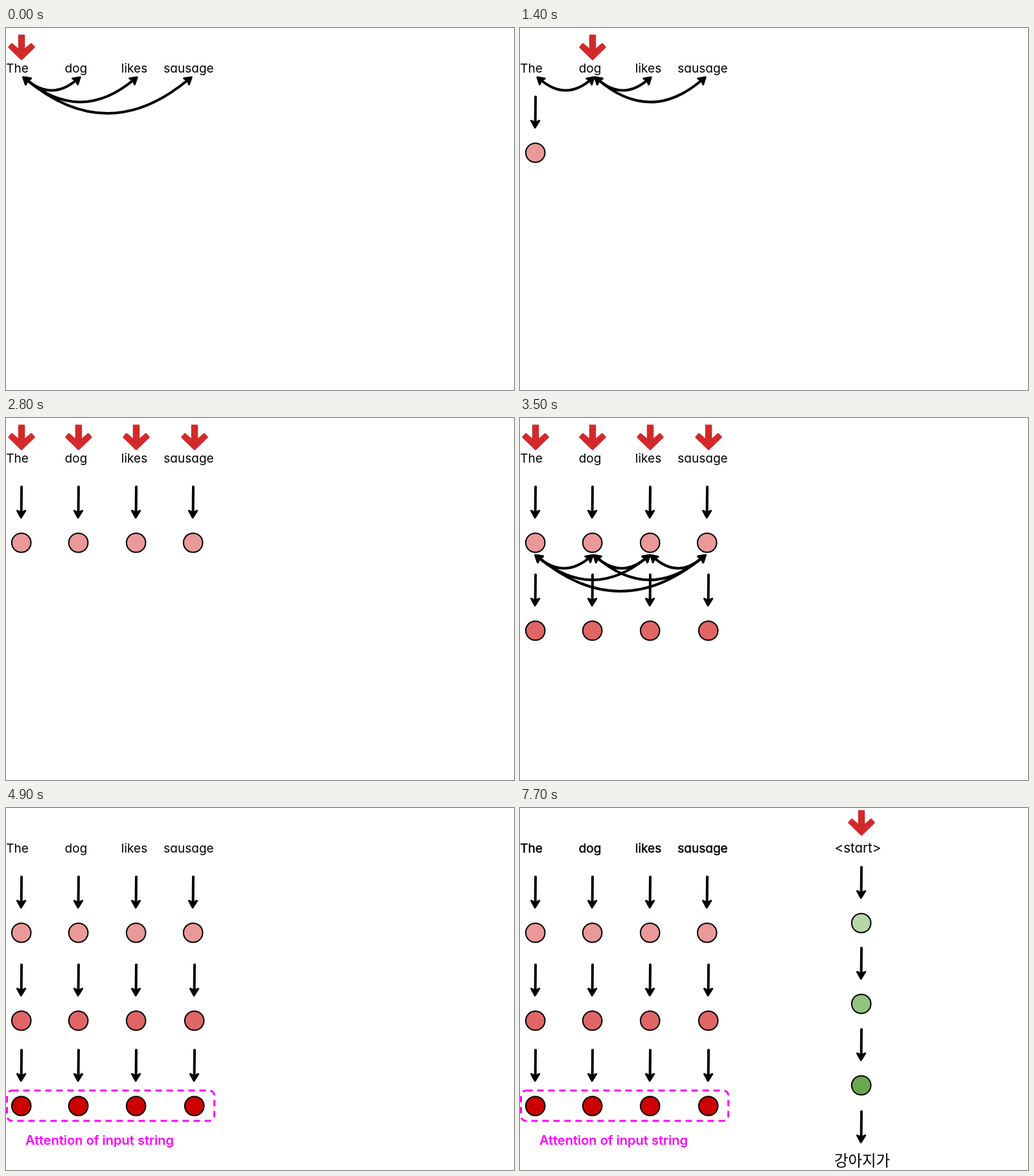
An HTML page that plays this animation: 784 px wide and 560 px high, repeating every 8 s.

```html
<!DOCTYPE html>
<html lang="en">
<head>
<meta charset="utf-8">
<title>Attention diagram</title>
<style>
  html, body { margin: 0; width: 100%; height: 100%; overflow: hidden; background: #fff; }
  svg { display: block; }
  text { font-family: Inter, "Open Sans", sans-serif; font-feature-settings: "cv11"; text-anchor: middle; }
  .hangul { font-family: "Noto Sans CJK KR", "Noto Sans CJK", sans-serif; }
</style>
</head>
<body>
<svg id="stage" width="784" height="560" viewBox="0 0 784 560"></svg>
<script>
const STEP = 700, LOOP = 8000;
const MAGENTA = '#ff00ff';
const stage = document.getElementById('stage');

const words = [['The', 17.5], ['dog', 108], ['likes', 198], ['sausage', 282]];
const columns = [24, 112, 201, 291];
const encoder = [
  { arrow: 105, node: 193, fill: '#ea9999', xs: [24, 112, 201, 289] },
  { arrow: 241, node: 329, fill: '#e06666', xs: columns },
  { arrow: 373, node: 461, fill: '#cc0000', xs: columns }
];
const decoder = [
  { arrow: 90, node: 178, fill: '#b6d7a8' },
  { arrow: 215, node: 303, fill: '#93c47d' },
  { arrow: 341, node: 429, fill: '#6aa84f' }
];
const wordTips = [26, 115, 203, 287], nodeTips = [23, 113, 201, 287];
const arcDepth = [0, 19.5, 37.5, 55];
const pairs = [[0, 1], [0, 2], [0, 3], [1, 2], [1, 3], [2, 3]];

const label = (str, x, y, size, extra = '') =>
  `<text x="${x}" y="${y}" font-size="${size}" ${extra}>${str}</text>`;

const pointer = (x, y) =>
  `<path transform="translate(${x} ${y})" fill="#d22a2a" stroke="#d22a2a" stroke-width="2.5" stroke-linejoin="round"
    d="M-4 1.5H4V24L15 14.5 19.5 19.5 0 38.5-19.5 19.5-15 14.5-4 24Z"/>`;

const downArrow = (x, y) =>
  `<g transform="translate(${x} ${y})" stroke="#000" stroke-linecap="round" stroke-linejoin="round">
    <path d="M0 1.5L-.4 43" stroke-width="4"/>
    <path d="M-6.5 38.5L-.8 49 5.7 38.5-.4 41.5Z" stroke-width="3"/></g>`;

const node = (x, y, fill) =>
  `<circle cx="${x - .3}" cy="${y}" r="14.8" fill="${fill}" stroke="#000" stroke-width="2"/>`;

const cell = (x, row) => downArrow(x, row.arrow) + node(x, row.node, row.fill);

function head(x, y, angle) {
  return `<path transform="translate(${x} ${y}) rotate(${angle})" d="M-1 0L-11-6-9 0-11 6Z"
    stroke="#000" stroke-width="3" stroke-linejoin="round"/>`;
}

function arc(tips, y, [a, b]) {
  const x1 = tips[a], x2 = tips[b], depth = arcDepth[b - a] * 2;
  const angle = Math.atan2(depth, (x2 - x1) / 2) * 180 / Math.PI;
  return `<path d="M${x1 + 4} ${y + 3}Q${(x1 + x2) / 2} ${y + depth} ${x2 - 4} ${y + 3}"
    fill="none" stroke="#000" stroke-width="4"/>` + head(x1, y, 180 + angle) + head(x2, y, -angle);
}

const arcs = (tips, y, list) => list.map(p => arc(tips, y, p)).join('');
const arcsOf = i => pairs.filter(p => p.includes(i));

// Dotted link from the dashed box to a decoder layer at height `y`
function link(x, y) {
  const k = (459 - y) / 281, sx = (x - 324) / 167;
  const p = (px, py) => `${324 + (px - 324) * sx} ${459 - (459 - py) * k} `;
  const d = `M${p(324, 459)}C${p(376, 451)}${p(402, 425)}${p(403, 384)}` +
    `C${p(402, 360)}${p(400, 340)}${p(401, 318)}C${p(404, 250)}${p(430, 196)}${p(479, 182)}`;
  return `<path d="${d}" fill="none" stroke="${MAGENTA}" stroke-width="4" stroke-linecap="round" stroke-dasharray="0 10.5"/>
    <path transform="translate(${x} ${y})" d="M-14-2L-1 .5-10 10Z" fill="${MAGENTA}"
      stroke="${MAGENTA}" stroke-width="2" stroke-linejoin="round"/>`;
}

const frameBox = () =>
  `<rect x="1.5" y="437" width="320" height="47" rx="8" fill="none" stroke="${MAGENTA}" stroke-width="3" stroke-dasharray="10 7"/>` +
  label('Attention of input string', 144.5, 521, 20, `fill="${MAGENTA}" font-weight="600"`);

function encoderPart(step) {
  const filled = [step < 1 ? 0 : step < 3 ? 1 : step < 4 ? 2 : 4, step < 5 ? 0 : 4, step < 6 ? 0 : 4];
  const active = step < 2 ? [0] : step < 4 ? [1] : step < 7 ? [0, 1, 2, 3] : [];
  const weight = step < 8 ? '' : 'stroke="#000" stroke-width=".5"';
  let out = words.map(([w, x]) => label(w, x, 69, 19, weight)).join('');
  encoder.forEach((row, r) => row.xs.slice(0, filled[r]).forEach(x => out += cell(x, row)));
  out += active.map(i => pointer(columns[i], 10)).join('');
  if (step === 0) out += arcs(wordTips, 75.5, arcsOf(0));
  if (step === 2) out += arcs(wordTips, 75.5, arcsOf(1));
  if (step === 5) out += arcs(nodeTips, 211.5, pairs);
  if (step === 6) out += arcs(nodeTips, 347.5, pairs);
  if (step >= 7) out += frameBox();
  return out;
}

function decoderPart(step) {
  if (step < 8) return '';
  let out = pointer(527, 3) + label('&lt;start&gt;', 521.5, 69, 20.5);
  out += decoder.slice(0, step - 7).map(row => cell(527, row)).join('');
  if (step === 8) out += link(478, 64);
  if (step === 9) out += link(491, 178);
  if (step === 10) out += link(491, 303);
  if (step === 11) out += downArrow(527, 468) + label('강아지가', 528, 553.5, 23.4, 'class="hangul"');
  return out;
}

let shown = -1;
const start = performance.now();

function draw() {
  const step = Math.floor((performance.now() - start) % LOOP / STEP);
  if (step !== shown) {
    stage.innerHTML = encoderPart(step) + decoderPart(step);
    shown = step;
  }
  requestAnimationFrame(draw);
}
draw();
</script>
</body>
</html>
```
